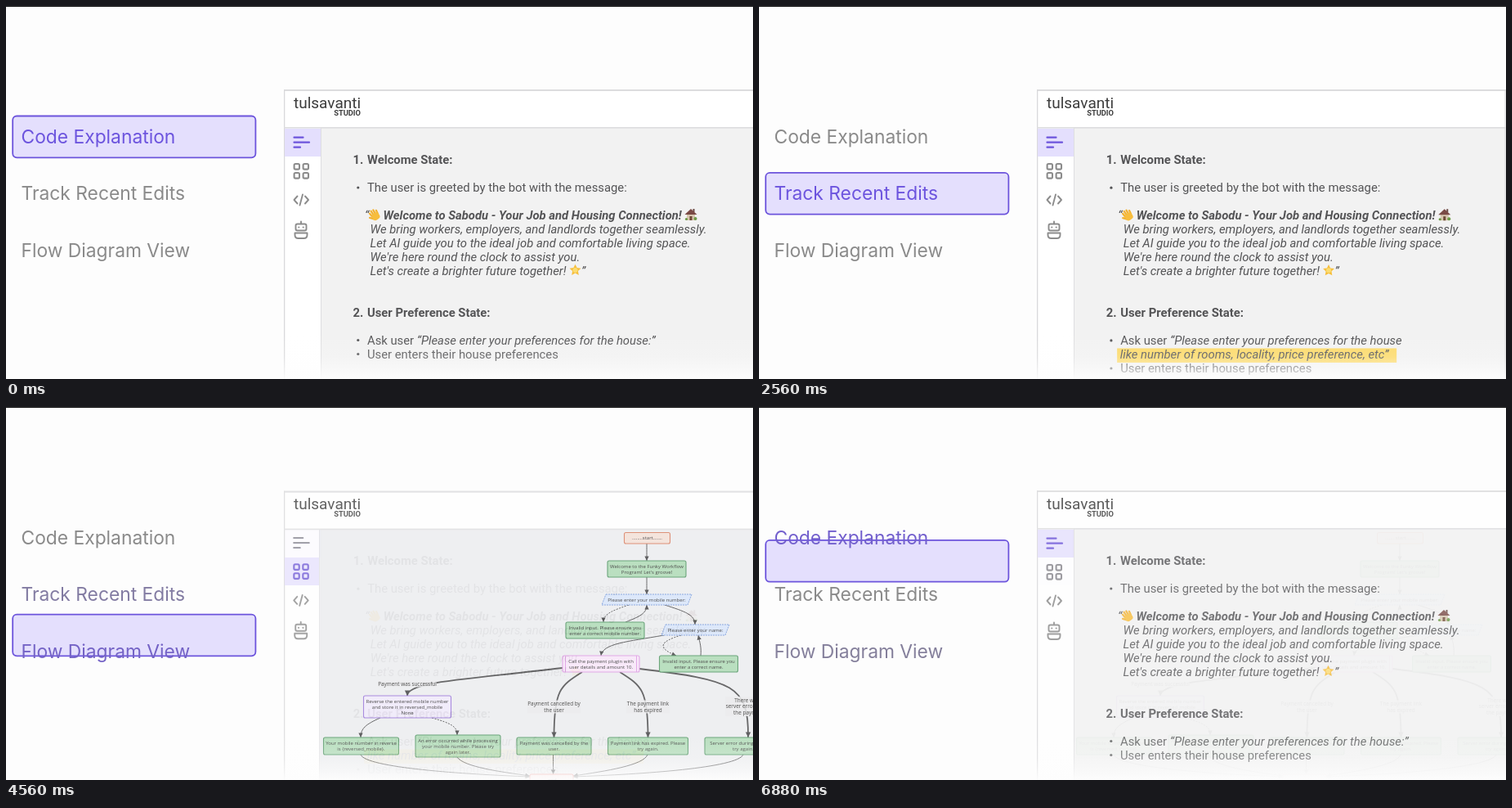
An HTML page with a canvas for the animation above (6.96 s loop, 914x456 px).

```html
<!DOCTYPE html>
<html lang="en">
<head>
<meta charset="utf-8">
<title>Studio views</title>
<style>
html, body { margin: 0; width: 100%; height: 100%; overflow: hidden; background: #fdfdfd; }
canvas { display: block; }
</style>
</head>
<body>
<canvas id="stage" width="914" height="456"></canvas>
<script>
const W = 914, H = 456, LOOP = 6960, FADE = 405;
const PAGE = '#fdfdfd', PURPLE = '#6c54dc', LILAC = '#e4dffd', GREY = '#8c8c8c', INK = '#545456';
const stage = document.getElementById('stage').getContext('2d');

function makeLayer(draw) {
  const c = document.createElement('canvas');
  c.width = W;
  c.height = H;
  draw(c.getContext('2d'));
  return c;
}

function text(g, s, x, y, font, color, align = 'left') {
  g.font = font;
  g.fillStyle = color;
  g.textAlign = align;
  g.fillText(s, x, y);
  return x + g.measureText(s).width;
}

function box(g, x, y, w, h, r, fill, line, lw = 1) {
  g.beginPath();
  g.roundRect(x, y, w, h, r);
  if (fill) { g.fillStyle = fill; g.fill(); }
  if (line) { g.strokeStyle = line; g.lineWidth = lw; g.stroke(); }
}

function path(g, d, color, lw) {
  g.strokeStyle = color;
  g.lineWidth = lw;
  g.stroke(new Path2D(d));
}

function rect(g, x, y, w, h, fill) {
  g.fillStyle = fill;
  g.fillRect(x, y, w, h);
}

function dot(g, x, y, r, fill) {
  g.fillStyle = fill;
  g.beginPath();
  g.arc(x, y, r, 0, 7);
  g.fill();
}

// Window frame, header and icon strip
function chrome(g, active, side, panel) {
  const top = active ? 102.7 : 102;
  rect(g, 340, top, 574, 354, '#ffffff');
  rect(g, side, 149, W - side, 307, panel);
  rect(g, 340, top, 574, 2, '#dcdcde');
  rect(g, 340, top, 1.3, 354, '#d9d9db');
  rect(g, 340, top + 46, 574, 1.6, '#dddddf');
  rect(g, side, 149, 1, 307, '#dedee0');
  rect(g, 341, active ? 184 : 150, side - 341, 34, LILAC);
  text(g, 'tulsavanti', 352, 125, '400 19px Roboto, sans-serif', '#3c3c3c');
  text(g, 'STUDIO', 434, 134, '700 9.3px Roboto, sans-serif', '#3c3c3c', 'right');

  g.save();
  if (active) g.translate(-0.3, -0.7);
  g.lineCap = g.lineJoin = 'round';
  path(g, 'M352.5 160.700h11M352.5 166.700h18.500M352.5 172.700h7.5', active ? GREY : PURPLE, 2.2);
  const gridColor = active ? PURPLE : GREY;
  for (const x of [352.6, 363.6])
    for (const y of [193, 204]) box(g, x, y, 6.4, 6.6, 1.6, null, gridColor, 2.1);
  path(g, 'M356.500 232.500l-4 4.500l4 4.500M366 232.500l4 4.500l-4 4.500M363 230.500l-3.500 13', GREY, 1.9);
  path(g, 'M361 263.500v2.500M353.500 277.500h15v2.500q0 4-4 4h-7q-4 0-4-4z', GREY, 1.9);
  box(g, 354.5, 266.5, 13, 8, 2, null, GREY, 1.9);
  dot(g, 358.3, 270.5, 1.1, GREY);
  dot(g, 363.7, 270.5, 1.1, GREY);
  g.restore();
}

function hand(g, x, y) {
  g.save();
  g.translate(x, y);
  g.rotate(-0.6);
  g.lineCap = 'round';
  path(g, 'M-3.500 0l-.500-5M-1 0v-6.500M1.500 0l.500-6M4 1l.800-4.500M-4 3l-2.800-3.500', '#f2b233', 2.3);
  box(g, -4.5, -2, 9.5, 8.5, 3.5, '#f7bd3d');
  g.restore();
}

function house(g, x, y) {
  rect(g, x - 5, y - 1, 10, 8, '#d8c7b0');
  rect(g, x - 1.5, y + 2, 3, 5, '#6e4a37');
  rect(g, x + 2.5, y - 7, 2, 4, '#6b4a44');
  g.fillStyle = '#7a4a45';
  g.fill(new Path2D(`M${x - 7.5} ${y}l7.500-7l7.500 7z`));
  dot(g, x + 5.5, y + 5, 2, '#6d9b46');
  dot(g, x - 5.5, y + 5.5, 1.6, '#6d9b46');
}

function star(g, x, y) {
  g.beginPath();
  for (let i = 0; i < 10; i++) {
    const r = i % 2 ? 3.6 : 7.3, a = i * Math.PI / 5 - Math.PI / 2;
    g.lineTo(x + r * Math.cos(a), y + r * Math.sin(a));
  }
  g.fillStyle = '#f6bf3c';
  g.fill();
  dot(g, x, y, 3, '#fbdc72');
}

const ROMAN = '400 14.8px Roboto, sans-serif';
const BOLD = '700 14.8px Roboto, sans-serif';
const ITALIC = 'italic 400 14.8px Roboto, sans-serif';
const BOLD_ITALIC = 'italic 700 14.8px Roboto, sans-serif';

function explanation(g, edited) {
  chrome(g, 0, 385, '#f2f2f2');
  if (edited) {
    rect(g, 912.5, 102, 1.2, 354, '#d9d9db');
    g.translate(340, 102);
    g.scale(1.0015, 1.0015);
    g.translate(-340, -102);
    rect(g, 438, 418, 341.5, 17.5, '#fcd966');
  }
  const put = (s, x, y, font = ROMAN) => text(g, s, x, y, font, INK);
  const bullet = y => dot(g, 430.8, y - 5, 1.6, INK);

  put('1.', 424.5, 192.5, BOLD);
  put('Welcome State:', 442, 192.5, BOLD);
  bullet(227);
  put('The user is greeted by the bot with the message:', 442, 227);
  put('“', 439, 260.5, ITALIC);
  hand(g, 451, 255.5);
  put('Welcome to Sabodu - Your Job and Housing Connection!', 461.5, 260.5, BOLD_ITALIC);
  house(g, 838, 255);
  [
    'We bring workers, employers, and landlords together seamlessly.',
    'Let AI guide you to the ideal job and comfortable living space.',
    "We're here round the clock to assist you.",
    "Let's create a brighter future together!"
  ].forEach((s, i) => put(s, 445.5, 277.6 + i * 17, ITALIC));
  star(g, 696.5, 323);
  put('”', 704, 328.6, ITALIC);

  put('2.', 424.5, 379.5, BOLD);
  put('User Preference State:', 442, 379.5, BOLD);
  bullet(413.5);
  const x = put('Ask user ', 442, 413.5);
  put('“Please enter your preferences for the house' + (edited ? '' : ':”'), x, 413.5, ITALIC);
  if (edited) put('like number of rooms, locality, price preference, etc”', 441.5, 430.5, ITALIC);
  const last = edited ? 447.5 : 430.5;
  bullet(last);
  put('User enters their house preferences', 442, last);
}

function lines(g, rows, x, y, size = 6, pitch = 7) {
  rows.forEach((s, i) => text(g, s, x, y + (i - (rows.length - 1) / 2) * pitch + size * 0.36,
    `500 ${size}px "Open Sans", sans-serif`, '#0c0c0c', 'center'));
}

function node(g, x, y, w, h, fill, line, ...rows) {
  box(g, x, y, w, h, 2, fill, line, 1.1);
  lines(g, rows, x + w / 2, y + h / 2);
}

const green = (g, x, y, w, h, ...rows) => node(g, x, y, w, h, '#a2d6aa', '#35854a', ...rows);

function slanted(g, x, y, w, s) {
  const p = new Path2D(`M${x + 5} ${y}h${w - 5}l-5 13h${5 - w}z`);
  g.fillStyle = '#d3e2fb';
  g.fill(p);
  g.setLineDash([2, 1]);
  g.strokeStyle = '#6089d6';
  g.lineWidth = 1;
  g.stroke(p);
  g.setLineDash([]);
  lines(g, [s], x + w / 2, y + 6.5);
}

// Cubic edge: start, two controls, end; arrowhead along the last tangent
function edge(g, pts, lw = 1, dashed = false) {
  const [x0, y0, x1, y1, x2, y2, x3, y3] = pts;
  if (dashed) g.setLineDash([2, 1.5]);
  path(g, `M${x0} ${y0}C${x1} ${y1} ${x2} ${y2} ${x3} ${y3}`, '#303032', lw);
  g.setLineDash([]);
  const r = lw > 1 ? 6.5 : 5.5;
  g.save();
  g.translate(x3, y3);
  g.rotate(Math.atan2(y3 - y2, x3 - x2));
  g.fillStyle = '#252527';
  g.fill(new Path2D(`M0 0L${-r} ${-r * 0.48}V${r * 0.48}z`));
  g.restore();
}

function diagram(g) {
  chrome(g, 1, 383, '#ebecef');
  const down = (x, y0, y1) => edge(g, [x, y0, x, y0 + 5, x, y1 - 5, x, y1]);
  down(784, 167, 188);
  down(784, 208, 229);
  down(669.5, 425, 449);
  edge(g, [762, 242, 745, 248, 731, 252, 731, 263], 1, true);
  edge(g, [758, 263, 776, 256, 784, 252, 784, 242]);
  edge(g, [806, 242, 831, 250, 843, 254, 843, 266]);
  edge(g, [826, 279, 800, 287, 796, 294, 820, 304], 1, true);
  edge(g, [850, 304, 851, 294, 849, 288, 847, 279]);
  edge(g, [805, 279, 760, 287, 730, 289, 728, 304]);
  edge(g, [681, 319, 555, 334, 491, 336, 491, 353], 1.8);
  edge(g, [705, 324, 678, 341, 670.5, 346, 670.5, 404], 1.8);
  edge(g, [751, 324, 778, 341, 785.5, 346, 785.5, 404], 1.8);
  edge(g, [775, 320, 890, 334, 909, 340, 908, 404], 1.8);
  edge(g, [458, 380, 440, 388, 434, 393, 434, 404]);
  edge(g, [521, 380, 546, 387, 552, 391, 552, 401], 1, true);
  edge(g, [434, 425, 440, 441, 560, 449, 641, 452]);
  edge(g, [552, 428, 560, 440, 605, 446, 641, 451]);
  edge(g, [785, 425, 780, 438, 735, 445, 694, 451]);
  edge(g, [902, 425, 895, 441, 780, 449, 694, 452]);

  node(g, 756.5, 153.5, 56, 13.5, '#f3dcd2', '#d36a48', '........start.......');
  green(g, 736, 188, 96, 20, 'Welcome to the Funky Workflow', "Program! Let's groove!");
  slanted(g, 729, 229, 110, 'Please enter your mobile number:');
  green(g, 685, 263, 96, 20, 'Invalid input. Please ensure you', 'enter a correct mobile number.');
  slanted(g, 802, 266, 83, 'Please enter your name:');
  green(g, 799.5, 304, 96, 20, 'Invalid input. Please ensure you', 'enter a correct name.');
  node(g, 681, 304, 94, 20, '#f8e4fa', '#d98be0', 'Call the payment plugin with', 'user details and amount 10.');
  path(g, 'M684.500 304v20M771.500 304v20', '#d98be0', 1);
  node(g, 437.5, 353, 107, 27, '#efe7fb', '#8a62d4', 'Reverse the entered mobile number',
    'and store it in reversed_mobile', 'None');

  const label = (x, y, w, ...rows) => {
    rect(g, x - w / 2, y - rows.length * 4, w, rows.length * 8, 'rgba(232,232,234,.85)');
    lines(g, rows, x, y, 6.4, 7.6);
  };
  label(491, 338.5, 72, 'Payment was successful');
  label(670.5, 366.5, 66, 'Payment cancelled by', 'the user');
  label(785.5, 366.5, 54, 'The payment link', 'has expired');
  label(909, 366, 58, 'There was a', 'server error during', 'the payment');

  green(g, 388.5, 404, 92, 21, 'Your mobile number in reverse', 'is {reversed_mobile}.');
  green(g, 501, 401, 104, 27, 'An error occurred while processing', 'your mobile number. Please try', 'again later.');
  green(g, 625, 404, 91, 21, 'Payment was cancelled by the', 'user.');
  green(g, 736.5, 404, 98, 21, 'Payment link has expired. Please', 'try again.');
  green(g, 855, 404, 94, 21, 'Server error during payment,', 'try again.');
  node(g, 641, 449, 53, 13, '#f9dede', '#e0584e', '........end.......');
}

const views = [
  makeLayer(g => explanation(g, false)),
  makeLayer(g => explanation(g, true)),
  makeLayer(diagram)
];
const tabs = ['Code Explanation', 'Track Recent Edits', 'Flow Diagram View'];
const starts = [1975, 4305, 6603];

const fog = stage.createLinearGradient(0, 402, 0, H);
[[0, 0], [0.5, 0.18], [0.75, 0.5], [1, 0.93]]
  .forEach(([at, a]) => fog.addColorStop(at, `rgba(253,253,253,${a})`));

// Ease-in-out: cubic-bezier(.42, 0, .58, 1)
function ease(x) {
  if (x <= 0) return 0;
  if (x >= 1) return 1;
  let lo = 0, hi = 1;
  for (let i = 0; i < 24; i++) {
    const u = (lo + hi) / 2, v = 1 - u;
    if (3 * v * v * u * 0.42 + 3 * v * u * u * 0.58 + u * u * u < x) lo = u;
    else hi = u;
  }
  return lo * lo * (3 - 2 * lo);
}

function mix(k) {
  const c = [[138, 108], [138, 84], [138, 222]].map(([a, b]) => Math.round(a + (b - a) * k));
  return `rgb(${c})`;
}

function render(t) {
  let from = 0;
  while (from < 2 && t >= starts[from + 1]) from++;
  const to = (from + 1) % 3;
  const p = ease((t - starts[from]) / FADE);
  const g = stage;

  rect(g, 0, 0, W, H, PAGE);
  g.globalAlpha = 1 - p;
  g.drawImage(views[from], 0, 0);
  g.globalAlpha = p;
  g.drawImage(views[to], 0, 0);
  g.globalAlpha = 1;
  rect(g, 330, 402, W - 330, H - 402, fog);

  const y = 134.5 + 69.3 * (from + (to - from) * p);
  box(g, 8.2, y, 297.2, 50.8, 5, LILAC, PURPLE, 1.8);
  tabs.forEach((s, i) => {
    const k = i === from ? 1 - p : i === to ? p : 0;
    text(g, s, 18.5, 167.8 + i * 69.4, '400 22.8px Inter, sans-serif', mix(k));
  });
  rect(g, 0, 0, W, 1, '#161616');
}

const begin = performance.now();
function tick() {
  render((performance.now() - begin) % LOOP);
  requestAnimationFrame(tick);
}
tick();
</script>
</body>
</html>
```
